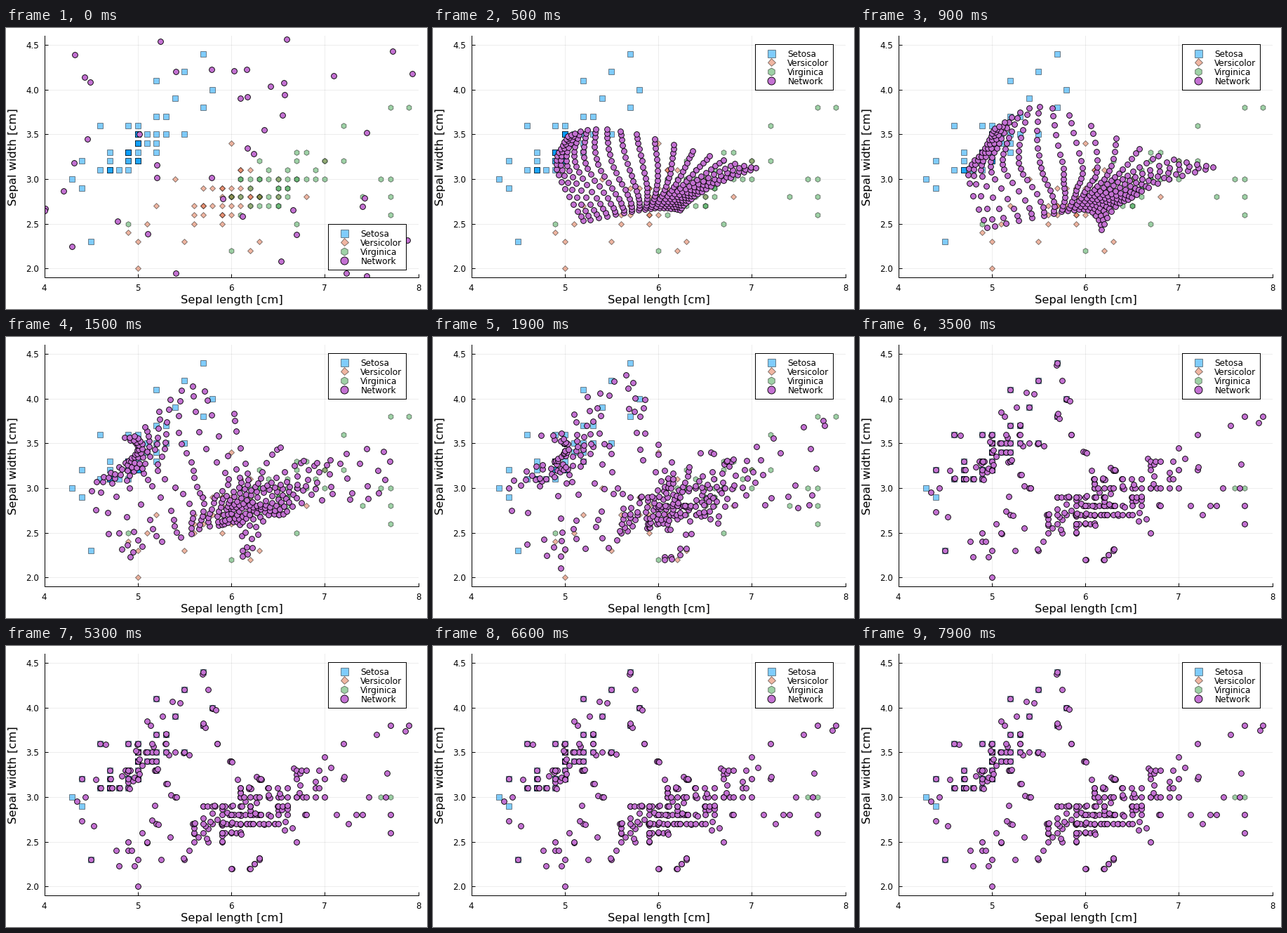
Write a matplotlib script that moves like this. It is 600 px wide and 400 px high and loops after 8000 ms.

```python
import numpy as np
import matplotlib.pyplot as plt
from matplotlib.animation import FuncAnimation

W, H, DPI = 600, 400, 100
FRAMES, STEP = 80, 100
PT = 72 / DPI
LEFT, RIGHT, TOP, BOTTOM = 54.5, 587.5, 11.2, 355
GRID = 18

plt.rcParams["font.family"] = "DejaVu Sans"
rng = np.random.default_rng(7)


def species(outer, mean, spread, corr, total=50):
    """A few outlying flowers plus a correlated cloud, measured to 0.1 cm."""
    z = rng.normal(size=(500, 2))
    z = z[np.hypot(*z.T) < 2][:total - len(outer)]
    z[:, 1] = corr * z[:, 0] + np.sqrt(1 - corr ** 2) * z[:, 1]
    return np.vstack([outer, np.round(mean + z * spread, 1)])


setosa = species(
    [(4.3, 3.0), (4.4, 2.9), (4.4, 3.2), (4.5, 2.3), (4.6, 3.6), (5.2, 4.1),
     (5.4, 3.9), (5.5, 4.2), (5.7, 4.4), (5.8, 4.0), (5.7, 3.8), (5.5, 3.5)],
    (5.0, 3.38), (0.22, 0.22), 0.6)
versicolor = species(
    [(4.9, 2.4), (5.0, 2.0), (5.0, 2.3), (5.1, 2.5), (5.2, 2.7), (5.4, 3.0),
     (5.5, 2.3), (6.2, 2.2), (6.3, 2.3), (6.0, 3.4), (7.0, 3.2), (6.8, 2.8)],
    (5.95, 2.82), (0.33, 0.17), 0.5)
virginica = species(
    [(4.9, 2.5), (6.0, 2.2), (6.7, 2.5), (7.2, 3.6), (7.7, 3.8), (7.9, 3.8),
     (7.7, 2.6), (7.7, 2.8), (7.7, 3.0), (7.6, 3.0), (7.4, 2.8), (7.2, 3.2)],
    (6.45, 2.98), (0.3, 0.19), 0.5)


def train(data):
    """Self-organizing map: one set of node positions per frame."""
    start = rng.uniform((1, -0.5), (11, 7), (GRID ** 2, 2))
    cells = np.stack(np.meshgrid(*[np.arange(GRID)] * 2), -1).reshape(-1, 2)
    gap2 = ((cells[:, None] - cells) ** 2).sum(axis=2)
    nodes = data.mean(axis=0) + (cells / (GRID - 1) - 0.5) * (3, 1.6)
    history = [start]
    for i in range(1, FRAMES):
        radius = max(0.25, 2.6 * np.exp(-1.1 * (i * STEP / 1000 - 0.9)))
        for _ in range(3):
            dist2 = ((data[:, None] - nodes) ** 2).sum(axis=2)
            pull = np.exp(-gap2[:, dist2.argmin(axis=1)] / (2 * radius ** 2))
            total = pull.sum(axis=1, keepdims=True)
            rate = 1 - np.exp(-6 * total)
            nodes = nodes + rate * (pull @ data / (total + 1e-12) - nodes)
        history.append(nodes)
    return history


history = train(np.vstack([setosa, versicolor, virginica]))


def rect(x, y, w, h):
    return [x / W, 1 - (y + h) / H, w / W, h / H]


def legend_rect(i):
    return rect(458.8, 278.8 if i == 0 else 22.8, 111, 65)


def style(marker, color, alpha, size):
    if marker == "D":
        size /= 2 ** 0.5
    return dict(ls="none", marker=marker, ms=size * PT, mfc=color, mec="black",
                mew=0.9 * PT, alpha=alpha)


SERIES = [
    ("Setosa", "s", "#009afa", 0.5, setosa),
    ("Versicolor", "D", "#e36f47", 0.5, versicolor),
    ("Virginica", "h", "#3ea44e", 0.5, virginica),
    ("Network", "o", "#c371d2", 1, history[0]),
]

fig = plt.figure(figsize=(W / DPI, H / DPI), dpi=DPI, facecolor="white")
ax = fig.add_axes(rect(LEFT, TOP, RIGHT - LEFT, BOTTOM - TOP))
ax.set(xlim=(4, 8), ylim=(1.9, 4.6), xticks=range(4, 9),
       yticks=np.arange(2, 4.6, 0.5))
ax.spines[["top", "right"]].set_visible(False)
ax.spines[["left", "bottom"]].set_linewidth(PT)
ax.set_axisbelow(True)
ax.grid(color="black", alpha=0.07, lw=PT)
ax.tick_params(direction="in", length=5 * PT, width=PT, labelsize=8.6)
ax.tick_params(axis="x", pad=9.3 * PT)
ax.tick_params(axis="y", pad=7.5 * PT)
label = dict(fontsize=11.8, ha="center", va="center")
fig.text(321.6 / W, 1 - 387.4 / H, "Sepal length [cm]", **label)
fig.text(11 / W, 1 - 184 / H, "Sepal width [cm]", rotation=90, **label)

legend = fig.add_axes(legend_rect(0))
legend.set(xlim=(0, 111), ylim=(65, 0), xticks=[], yticks=[])
legend.spines[:].set_linewidth(PT)

for row, (name, marker, color, alpha, xy) in enumerate(SERIES):
    dots, = ax.plot(*xy.T, **style(marker, color, alpha, 7.8))
    y = 13.4 + 13 * row
    legend.plot(23.5, y, **style(marker, color, alpha, 11))
    legend.text(46.5, y + 4.4, name, fontsize=8.7, va="baseline")


def update(i):
    dots.set_data(*history[i].T)
    legend.set_position(legend_rect(i))
    return dots, legend


anim = FuncAnimation(fig, update, frames=FRAMES, interval=STEP, repeat=True,
                     repeat_delay=0, blit=False)
plt.show()
```
